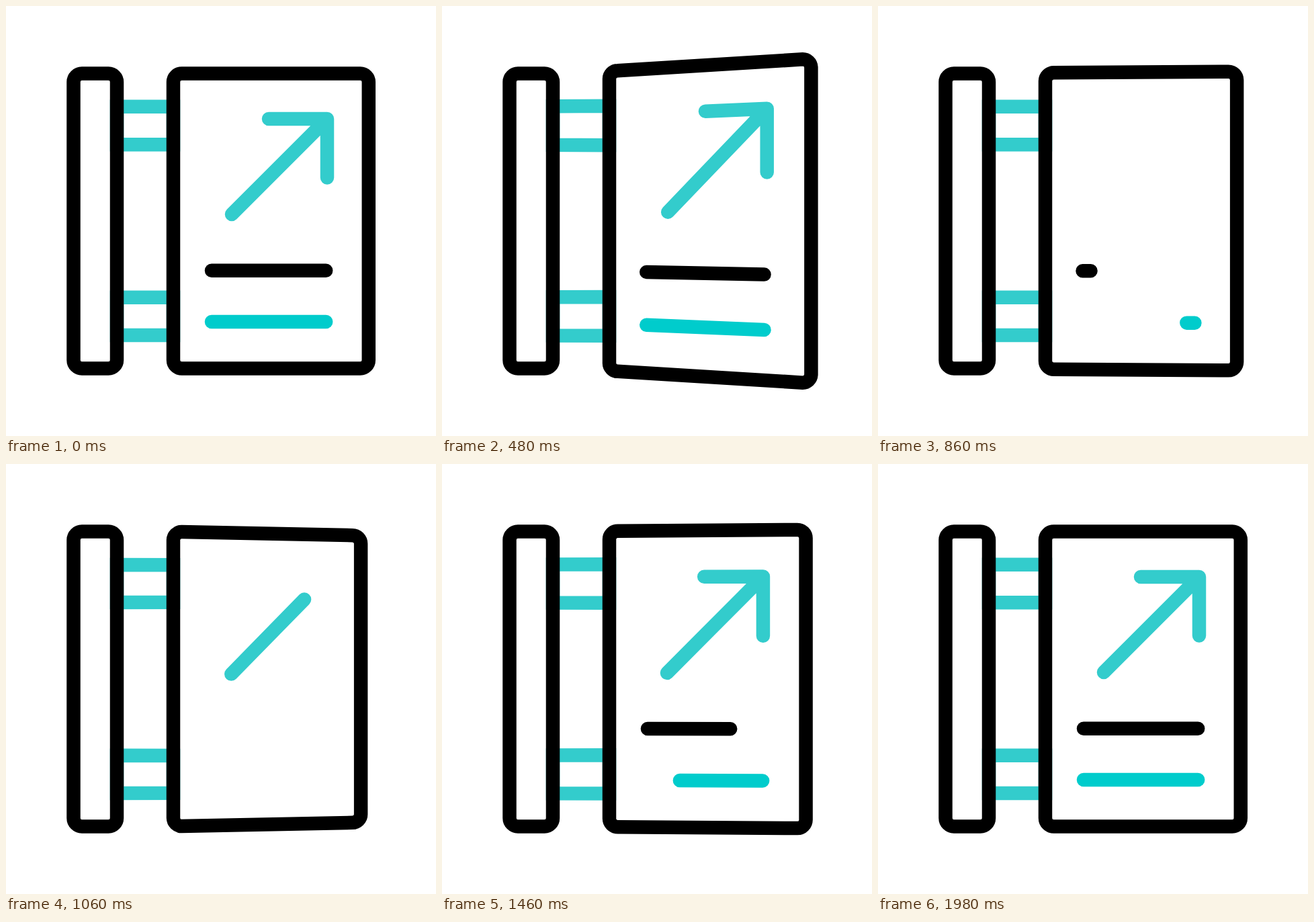
These frames come from a looping animation (640 px wide and 640 px high, 2580 ms). An HTML page:

```html
<!DOCTYPE html>
<html lang="en">
<head>
<meta charset="utf-8">
<title>Swinging sign</title>
<style>
  html, body { margin: 0; width: 100%; height: 100%; overflow: hidden; background: #fff; }
  svg { display: block; width: 100vw; height: 100vh; }
  path, rect { fill: none; stroke: #000; stroke-width: 20.5; }
  .aqua { stroke: #33cccc; }
  .teal { stroke: #00cccc; }
  .round { stroke-linecap: round; stroke-linejoin: round; }
</style>
</head>
<body>
<svg viewBox="0 0 640 640">
  <clipPath id="inside"><path id="mask"/></clipPath>
  <path id="brackets" class="aqua"/>
  <rect x="100.5" y="100.5" width="64.5" height="439" rx="12.5"/>
  <g clip-path="url(#inside)">
    <path id="arrow" class="aqua round"/>
    <path id="upper" class="round"/>
    <path id="lower" class="teal round"/>
  </g>
  <path id="panel"/>
</svg>
<script>
const LOOP = 2580, STEP = 20, RADIUS = 12.5;
const HINGE = 249, MIDDLE = 320, WIDTH = 290.8, HALF = 219.5, POST = 165;

// Swing keys: far edge x, half heights at hinge and far edge, arrow drift, bracket tilt.
const rest = { far: HINGE + WIDTH, nearHalf: HALF, farHalf: HALF, dx: 0, dy: 0, tilt: 0 };
const keys = [
  { t: 0, ...rest },
  { t: 500, far: 549.8, nearHalf: 223.2, farHalf: 242.3, dx: 2.3, dy: -3, tilt: 1 },
  { t: 1040, far: 526.3, nearHalf: 219.3, farHalf: 212.4, dx: 1.5, dy: 2.7, tilt: -0.45 },
  { t: 1280, far: 548.4, nearHalf: 220.2, farHalf: 226, dx: -2.2, dy: 0, tilt: 1 },
  { t: 1620, far: 535.5, nearHalf: 220.2, farHalf: 218.7, dx: 0, dy: 1.8, tilt: 0 },
  { t: 1980, ...rest },
  { t: LOOP, ...rest }
];

const el = id => document.getElementById(id);
const setPath = (id, d) => el(id).setAttribute('d', d);
const mix = (a, b, k) => a + (b - a) * k;
const mixPoint = (a, b, k) => a.map((v, i) => mix(v, b[i], k));
const progress = (t, from, to) => Math.min(1, Math.max(0, (t - from) / (to - from)));

function poseAt(t) {
  const i = keys.findIndex(key => t < key.t);
  const a = keys[i - 1], b = keys[i];
  const k = progress(t, a.t, b.t);
  return Object.fromEntries(Object.keys(rest).map(name => [name, mix(a[name], b[name], k)]));
}

// Perspective: carries a point of the resting sign onto the swung one.
function project(pose, x, y) {
  const u = (x - HINGE) / WIDTH;
  const depth = pose.farHalf / pose.nearHalf;
  const v = u / (u + depth * (1 - u));
  const scale = mix(pose.nearHalf, pose.farHalf, v) / HALF;
  return [mix(HINGE, pose.far, v), MIDDLE + (y - MIDDLE) * scale];
}

// Part of the segment a-b between fractions from and to.
function segment(a, b, from = 0, to = 1) {
  return to > from ? `M${mixPoint(a, b, from)}L${mixPoint(a, b, to)}` : '';
}

function panelPath({ far, nearHalf, farHalf }) {
  const corners = [
    [HINGE, MIDDLE - nearHalf], [far, MIDDLE - farHalf],
    [far, MIDDLE + farHalf], [HINGE, MIDDLE + nearHalf]
  ];
  const toward = (a, b) => mixPoint(a, b, RADIUS / Math.hypot(b[0] - a[0], b[1] - a[1]));
  return corners.map((p, i) => {
    const before = corners[(i + 3) % 4], after = corners[(i + 1) % 4];
    return `${i ? 'L' : 'M'}${toward(p, before)}A${RADIUS} ${RADIUS} 0 0 1 ${toward(p, after)}`;
  }).join('') + 'Z';
}

// The arrow flies out along its own direction, then is drawn anew: shaft, then barbs.
function arrowPath(pose, t) {
  const redrawn = t >= 880;
  const flight = redrawn ? 0 : Math.max(0, t - 500);
  const place = (x, y) => {
    const [px, py] = project(pose, x, y);
    return [px + pose.dx + 0.64 * flight, py + pose.dy - 0.62 * flight];
  };
  const shaft = redrawn ? progress(t, 900, 1100) : 1;
  const barbs = redrawn ? progress(t, 1100, 1300) : 1;
  const tip = place(478, 168);
  return segment(place(336, 310), tip, 0, shaft)
    + segment(tip, place(391, 168), 0, barbs)
    + segment(tip, place(478, 255.5), 0, barbs);
}

function bracketPath(top, tilt) {
  const near = 0.6 * tilt, bottom = top + 56.4;
  return `M${POST} ${top - near}L${HINGE} ${top - tilt}V${bottom + tilt}L${POST} ${bottom + near}Z`;
}

function draw(t) {
  const pose = poseAt(t);
  const panel = panelPath(pose);
  setPath('mask', panel);
  setPath('panel', panel);
  setPath('arrow', arrowPath(pose, t));
  setPath('brackets', bracketPath(149.8, pose.tilt) + bracketPath(433.7, 0.7 * pose.tilt));

  const shown = t < 1000 ? 1 - progress(t, 500, 888) : progress(t, 1190, 1565);
  const line = (y, from, to) => segment(project(pose, 306, y), project(pose, 476.2, y), from, to);
  setPath('upper', line(393.7, 0, shown));
  setPath('lower', line(470, 1 - shown, 1));
}

const start = performance.now();
function tick() {
  const t = (performance.now() - start) % LOOP;
  draw(Math.floor(t / STEP) * STEP);
  requestAnimationFrame(tick);
}
tick();
</script>
</body>
</html>
```
